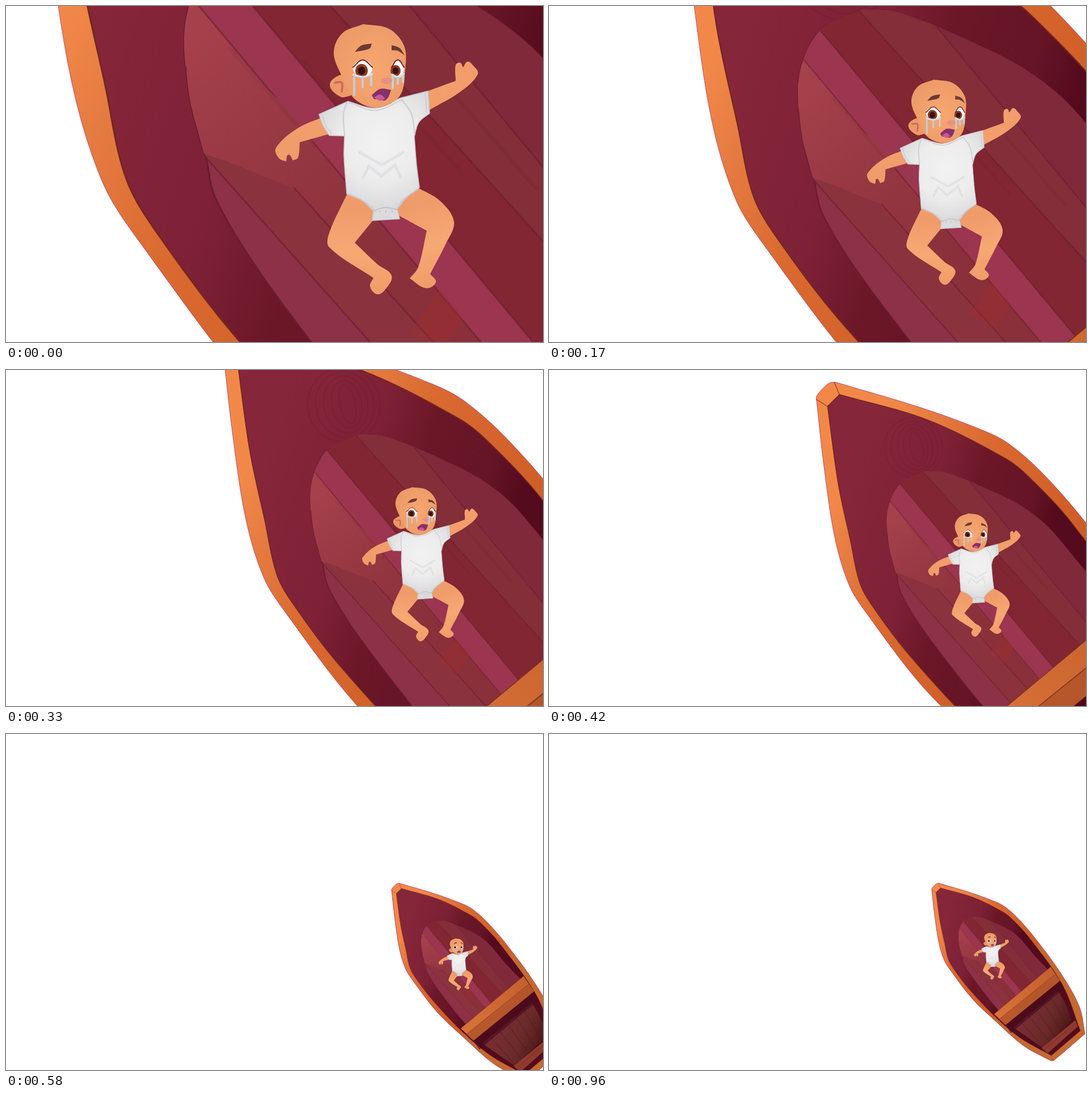
Write an HTML page that moves like this. It is 947x592 px and loops after 1.04 s.

```html
<!DOCTYPE html>
<html lang="en">
<head>
<meta charset="utf-8">
<title>Baby in a boat</title>
<style>
  html, body { margin: 0; width: 100%; height: 100%; overflow: hidden; background: #fff; }
  svg { display: block; width: 100%; height: 100%; }
</style>
</head>
<body>
<svg viewBox="0 0 947 592">
  <defs>
    <linearGradient id="rim" gradientUnits="userSpaceOnUse" x1="100" y1="0" x2="950" y2="510">
      <stop offset="0" stop-color="#f28848"/><stop offset=".15" stop-color="#e67c41"/>
      <stop offset=".4" stop-color="#d9692f"/><stop offset=".95" stop-color="#cc5c25"/>
      <stop offset="1" stop-color="#c4692f"/>
    </linearGradient>
    <linearGradient id="wall" gradientUnits="userSpaceOnUse" x1="150" y1="0" x2="910" y2="240">
      <stop offset="0" stop-color="#86263a"/><stop offset=".38" stop-color="#7e2137"/>
      <stop offset=".6" stop-color="#6b1728"/><stop offset=".85" stop-color="#651526"/>
      <stop offset="1" stop-color="#540b1d"/>
    </linearGradient>
    <linearGradient id="warm" gradientUnits="userSpaceOnUse" x1="320" y1="60" x2="640" y2="480">
      <stop offset="0" stop-color="#a5414b"/><stop offset=".5" stop-color="#963742"/>
      <stop offset="1" stop-color="#89303a"/>
    </linearGradient>
    <linearGradient id="seat" gradientUnits="userSpaceOnUse" x1="700" y1="850" x2="1300" y2="430">
      <stop offset="0" stop-color="#d87238"/><stop offset="1" stop-color="#c5602d"/>
    </linearGradient>
    <linearGradient id="rear" gradientUnits="userSpaceOnUse" x1="900" y1="850" x2="1450" y2="1060">
      <stop offset="0" stop-color="#7c2e36"/><stop offset=".6" stop-color="#6b2a2a"/>
      <stop offset="1" stop-color="#481613"/>
    </linearGradient>
    <radialGradient id="skin" gradientUnits="userSpaceOnUse" cx="650" cy="110" r="420">
      <stop offset="0" stop-color="#f5a16d"/><stop offset=".6" stop-color="#f09b6a"/>
      <stop offset=".78" stop-color="#f6a873"/><stop offset="1" stop-color="#ef9866"/>
    </radialGradient>
    <radialGradient id="head" cx=".55" cy=".55" r=".6">
      <stop offset="0" stop-color="#f8a770"/><stop offset="1" stop-color="#ec9a68"/>
    </radialGradient>
    <radialGradient id="cloth" gradientUnits="userSpaceOnUse" cx="660" cy="240" r="115">
      <stop offset="0" stop-color="#f2f2f2"/><stop offset=".6" stop-color="#ececec"/>
      <stop offset="1" stop-color="#dbdbdd"/>
    </radialGradient>
    <clipPath id="floorClip"></clipPath>
    <clipPath id="wallClip"></clipPath>
    <clipPath id="rearClip"></clipPath>
  </defs>
  <g id="scene"><g id="boat"></g><g id="baby"></g></g>
</svg>
<script>
const $ = id => document.getElementById(id);

function add(parent, tag, attrs) {
  const el = document.createElementNS('http://www.w3.org/2000/svg', tag);
  for (const k in attrs) el.setAttribute(k, attrs[k]);
  parent.appendChild(el);
  return el;
}

// Each run "x,y x,y ..." becomes a smooth curve; runs meet in corners.
const dist = (a, b) => Math.hypot(a[0] - b[0], a[1] - b[1]);
function runPath(run) {
  const p = run.split(' ').map(s => s.split(',').map(Number));
  let d = p[0].join();
  for (let i = 0; i < p.length - 1; i++) {
    const b = p[i], c = p[i + 1], a = p[i - 1] || b, e = p[i + 2] || c;
    const len = dist(b, c) / 3, m = len / dist(a, c), n = len / dist(b, e);
    d += `C${b.map((v, k) => v + (c[k] - a[k]) * m)} ${c.map((v, k) => v - (e[k] - b[k]) * n)} ${c}`;
  }
  return d;
}
const smooth = (...runs) => 'M' + runs.map(runPath).join('L');
const closed = (...runs) => smooth(...runs) + 'Z';

const fill = (g, d, color, extra) => add(g, 'path', { d, fill: color, ...extra });
const line = (g, d, color, width, extra) => add(g, 'path', {
  d, fill: 'none', stroke: color, 'stroke-width': width, 'stroke-linecap': 'round', ...extra });
const oval = (g, cx, cy, rx, ry, color, extra) => add(g, 'ellipse', { cx, cy, rx, ry, fill: color, ...extra });

function clipped(g, id, d) {
  add($(id), 'path', { d });
  return add(g, 'g', { 'clip-path': `url(#${id})` });
}

function drawHull(g) {
  const hull = closed('42,-418 50,-432 92,-472 118,-475',
    '118,-475 456,-374 697,-285 789,-236 916,-125 1086,69 1353,430 1551,783 1609,1062',
    '1609,1062 1290,1334 1262,1338',
    '1262,1338 984,1186 705,942 460,708 235,415 170,310 115,130 72,-150 42,-418');
  const inside = closed('86,-382 132,-428',
    '132,-428 472,-330 775,-180 863,-111 1033,72 1379,560 1562,1030',
    '1562,1030 1265,1284',
    '1265,1284 942,1101 670,868 413,592 280,419 213,307 174,135 127,-84 86,-382');

  fill(g, hull, 'url(#rim)', { stroke: '#b94a78', 'stroke-width': 1, 'vector-effect': 'non-scaling-stroke' });
  line(g, 'M44,-408L86,-382M112,-474L132,-428M1604,1070L1562,1030M1265,1284L1278,1336', '#9c4524', 3);
  fill(g, inside, 'url(#wall)', { stroke: '#74261f', 'stroke-width': 3 });

  const grain = clipped(g, 'wallClip', inside);
  for (let i = 0; i < 5; i++)
    oval(grain, 430 - i * 3, -225, 24 + i * 22, 60 + i * 14, 'none',
      { stroke: '#5f1229', 'stroke-width': 4, opacity: .15, transform: 'rotate(-12 430 -225)' });
}

function drawFloor(g) {
  const floor = closed('467,-132 368,-84 318,20 322,150 348,258',
    '352,262 370,340 455,480 627,705 737,835',
    '1230,410 1086,258 947,93 860,20 764,-34 553,-123 467,-132');
  fill(g, floor, '#8d3147', { stroke: '#6a1c30', 'stroke-width': 3 });
  const planks = clipped(g, 'floorClip', floor);

  // Left edge of each plank: x = x0 + slope * y
  const edges = [
    [115, .89, '#8a323e'], [220, .9, 'url(#warm)'], [340, .84, '#9b3550'],
    [435, .835, '#812632'], [572, .905, '#832e38'], [712, .828, '#80293b']];
  const top = -140, bottom = 900;
  for (const [x0, k, color] of edges) {
    const edge = `M${x0 + k * top},${top}L${x0 + k * bottom},${bottom}`;
    fill(planks, `${edge}H1600V${top}Z`, color);
    line(planks, edge, '#661c30', 3, { opacity: .55 });
  }
  fill(planks, closed('350,262 322,150 318,20', '318,20 560,300 350,262'), 'url(#warm)');
  fill(planks, 'M712,575L765,500L808,552L770,610Z', '#a02f2b', { opacity: .35 });
  for (let i = 0; i < 4; i++)
    line(planks, `M${395 + i * 130},${75 + i * 25}l150,172`, '#6e2030', 7, { opacity: .12 });
}

function drawStern(g) {
  const rear = closed('872,997 1336,620', '1336,620 1420,770 1475,935', '1475,935 1174,1206');
  fill(g, rear, 'url(#rear)', { stroke: '#43101a', 'stroke-width': 5 });
  const boards = clipped(g, 'rearClip', rear);
  for (let i = 1; i < 6; i++)
    line(boards, `M${872 + i * 77},${997 - i * 63}l${240 - i * 14},${245 + i * 10}`, '#471417', 4, { opacity: .8 });
  fill(g, 'M1162,1206L1510,922L1540,985L1228,1262Z', '#8f3a2e', { stroke: '#4d1719', 'stroke-width': 4 });
  line(g, 'M1190,1226L1524,950', '#73282a', 4);

  // Middle seat, its shadow and front face
  fill(g, 'M800,971L1355,518L1395,600L850,1055Z', '#470c1c', { opacity: .65 });
  fill(g, 'M679,860L1258,378L1355,518L797,971Z', 'url(#seat)', { stroke: '#7c321f', 'stroke-width': 3 });
  fill(g, 'M731,914L1306,452L1355,518L797,971Z', '#ad5029', { opacity: .75 });
  line(g, 'M731,914L1306,452', '#8a3a20', 4);
}

function drawLimbs(g) {
  const limb = (...runs) => fill(g, closed(...runs), 'url(#skin)');
  limb('575,190 515,215 476,250 481,268 494,274', '494,274 498,262 506,272', '506,272 515,267 518,240', '518,240 572,225');
  limb('735,153 793,132', '793,132 793,104 801,100 806,108', '806,108 814,98 823,104 832,120 800,152 745,184');
  limb('603,328 570,400 570,425 648,479', '648,479 642,494 655,508 670,498 680,475 655,455 615,417', '615,417 660,362');
  limb('722,318 765,343 790,380 775,420 748,472', '748,472 758,487 740,497 712,480', '712,480 727,460 742,396', '742,396 685,365');
}

function drawSuit(g) {
  fill(g, closed('603,168 552,191', '552,191 559,210 570,228', '570,228 597,229',
    '597,229 596,265 601,331', '601,331 628,343 648,361', '648,361 646,378', '646,378 694,375',
    '694,375 690,358', '690,358 707,337 729,320', '729,320 724,280 720,230',
    '720,230 728,205 747,189', '747,189 744,150', '744,150 696,162', '696,162 652,180 603,168'),
    'url(#cloth)', { stroke: '#c9c9ce', 'stroke-width': 1.5 });
  const fold = { opacity: .7 };
  line(g, smooth('605,170 652,184 699,165') + smooth('557,190 564,211 574,225') + 'M739,152L742,188', '#cfcfd4', 2);
  line(g, smooth('601,170 595,190 597,228') + smooth('699,166 715,190 721,226'), '#c6c6cc', 2.5, fold);
  line(g, smooth('605,331 634,346 652,362') + smooth('726,323 702,340 687,359'), '#c6c6cc', 2.5, fold);
  line(g, smooth('648,361 669,355 690,359'), '#c2c2c8', 2);
  line(g, 'M624,258L663,280L700,258M630,302L640,282L662,300L686,280L696,302', '#dadade', 5, { opacity: .6 });
  for (let i = -1; i <= 1; i++) oval(g, 670 + i * 11, 362, 1.3, 1.3, '#b8b8be');
}

function drawEye(g, x, rx, ix, ir) {
  const y = 110;
  oval(g, x, y, rx, 14, '#fbfbfd');
  oval(g, ix, y + 4, ir, ir + 1, '#8b3a24');
  oval(g, ix, y + 4, ir * .6, ir * .65, '#3a1210');
  line(g, smooth(`${x - rx},${y - 2} ${x},${y - 15} ${x + rx},${y - 2}`), '#6f2622', 2);
  // Tears
  line(g, smooth(`${x - rx + 1},${y + 11} ${x},${y + 15} ${x + rx - 1},${y + 10}`), '#d3e6f1', 3.5);
  line(g, `M${x - rx + 2},${y + 13}v${rx * 2}M${x},${y + 16}v${rx}M${x + rx - 2},${y + 13}v${rx}`, '#b9d5e6', 3.5);
}

function drawHead(g) {
  fill(g, closed('606,124 588,122 571,139 590,160 608,158'), '#ed9867');
  line(g, smooth('580,135 592,135 592,151'), '#c66a5c', 3.5);
  fill(g, closed('630,32 593,48 578,82 592,123 615,164 655,179 694,159 704,112 702,70 675,40 630,32'), 'url(#head)');

  drawEye(g, 629, 17, 627, 11);
  drawEye(g, 691, 11, 687, 9);
  fill(g, closed('615,81 626,70 645,66', '645,66 641,75 615,81'), '#6b3a33');
  fill(g, closed('680,69 694,74 703,87', '703,87 691,79 680,78'), '#6b3a33');
  oval(g, 671, 132, 10, 6, '#e98f84');
  fill(g, closed('645,157 660,146 679,148', '679,148 674,161 666,167 661,162 650,164 645,157'), '#87306a');
  fill(g, closed('649,161 660,156 669,163', '669,163 660,167 649,161'), '#c8589a');
}

// Time (ms), zoom, camera drift
const keys = [
  [0, 1, 0, 0], [170, .759, 0, 0], [330, .57, 0, 0], [420, .456, 0, 0],
  [580, .1915, 0, 0], [790, .19, -10, -11.6], [960, .1725, -20, -17.4]];
const LOOP = 1040, CX = 831, CY = 438;

// Poses are held on twos of a 24 fps clock, then longer at the end.
const holds = Array.from({ length: 9 }, (_, i) => i * 2).concat(19, 23)
  .map(tick => Math.round(tick * 100 / 24) * 10);

function camera(t) {
  const i = Math.max(1, keys.findIndex(k => k[0] >= t));
  const a = keys[i - 1], b = keys[i], u = (t - a[0]) / (b[0] - a[0]);
  return a.map((v, k) => v + (b[k] - v) * u);
}

function render(ms) {
  const held = holds.filter(h => h <= ms % LOOP).pop();
  const [, s, dx, dy] = camera(held);
  $('scene').setAttribute('transform', `translate(${CX * (1 - s) + dx} ${CY * (1 - s) + dy}) scale(${s})`);
}

for (const draw of [drawHull, drawFloor, drawStern]) draw($('boat'));
for (const draw of [drawLimbs, drawSuit, drawHead]) draw($('baby'));
render(0);

let start;
function tick(now) {
  start ??= now;
  render(Math.max(0, now - start));
  requestAnimationFrame(tick);
}
requestAnimationFrame(tick);
</script>
</body>
</html>
```
